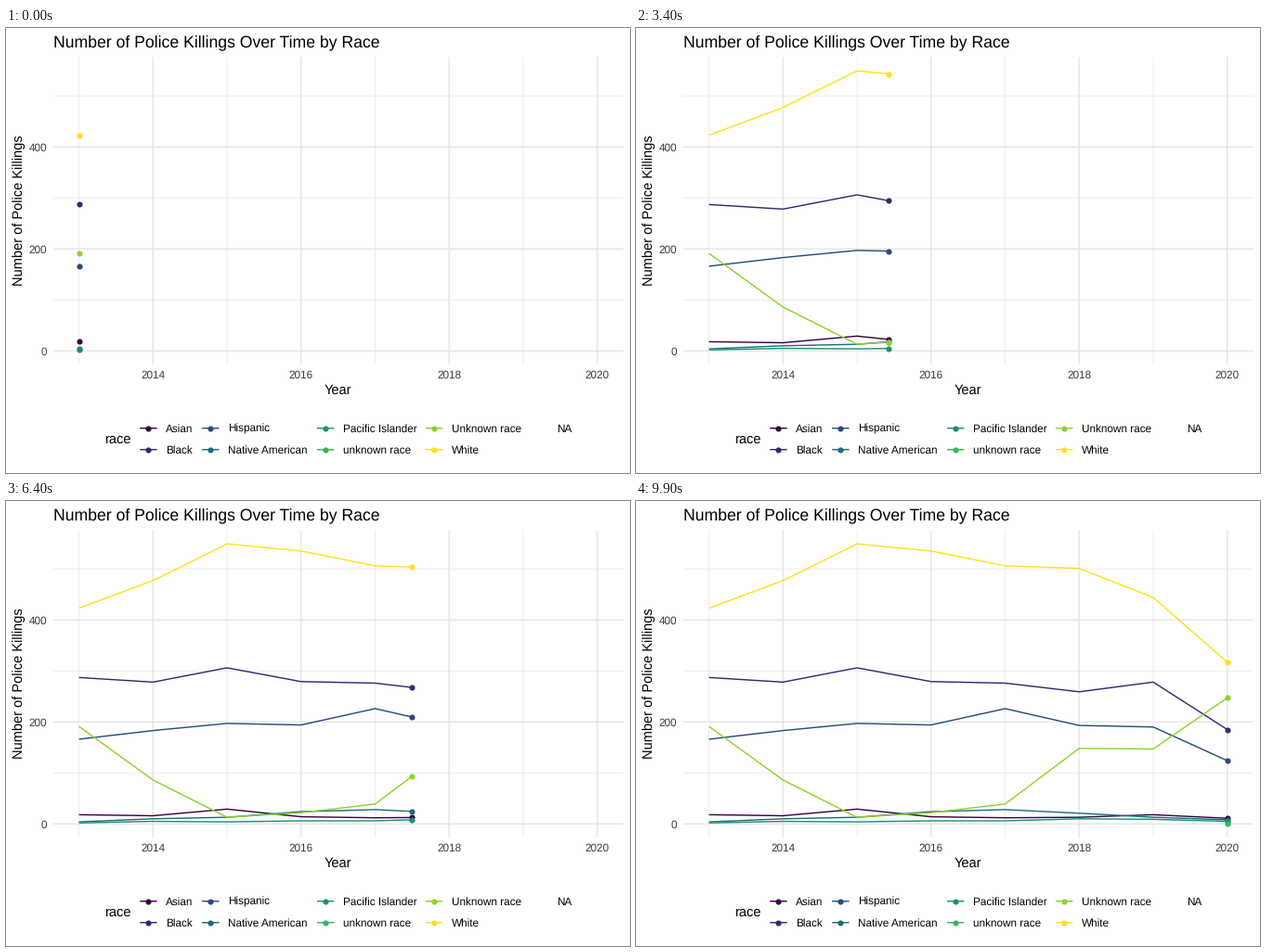
Recreate the animation shown at these times as a matplotlib script. Size 672 by 480 pixels, loop 10000 ms.

```python
import numpy as np
import matplotlib.pyplot as plt
from matplotlib.animation import FuncAnimation

W, H, DPI = 672, 480, 96
PT = 72 / DPI                      # points per pixel
FRAMES = 100
LEFT, RIGHT, TOP, BOTTOM = 50.7, 664.67, 31.2, 362.8
BIG, MEDIUM, SMALL = 13.2, 11, 8.8
LINE, HAIR, DOT = 1.42, 0.71, 6.15

plt.rcParams.update({
    "font.family": "Liberation Sans",
    "text.hinting": "none",
    "path.snap": False,
})


def tone(code):
    """Re-encode an sRGB hex colour with a 1.8 gamma."""
    v = np.array([int(code[i:i + 2], 16) for i in (1, 3, 5)]) / 255
    linear = np.where(v <= 0.04045, v / 12.92, ((v + 0.055) / 1.055) ** 2.4)
    return tuple(linear ** (1 / 1.8))


def px(year):
    step = (RIGHT - LEFT) / 7.7
    return LEFT + (np.asarray(year) - 2013 + 0.35) * step


def py(count):
    return 348.3 - 0.5502 * np.asarray(count)


YEARS = np.arange(2013, 2021)
SERIES = {
    "Asian": ("#440154", [18, 16, 29, 14, 12, 13, 18, 11]),
    "Black": ("#46337E", [287, 278, 306, 279, 276, 259, 278, 185]),
    "Hispanic": ("#365C8D", [166, 183, 197, 194, 226, 193, 190, 124]),
    "Native American": ("#277F8E", [4, 10, 13, 24, 28, 21, 13, 8]),
    "Pacific Islander": ("#1FA187", [2, 5, 4, 6, 6, 10, 9, 5]),
    "unknown race": ("#4AC16D", [np.nan] * 7 + [1]),
    "Unknown race": ("#9FDA3A", [191, 86, 13, 22, 39, 148, 147, 247]),
    "White": ("#FDE725", [423, 477, 549, 535, 506, 501, 444, 317]),
}
GRID, TICK = tone("#EBEBEB"), tone("#4D4D4D")

fig = plt.figure(figsize=(W / DPI, H / DPI), dpi=DPI, facecolor="white")
ax = fig.add_axes([0, 0, 1, 1])
ax.set(xlim=(0, W), ylim=(H, 0))
ax.axis("off")


def stroke(x, y, color, width=LINE, z=2):
    return ax.plot(x, y, color=color, lw=width * PT, zorder=z,
                   solid_capstyle="butt", solid_joinstyle="round")[0]


def dot(x, y, color):
    return ax.plot([x], [y], "o", color=color, ms=DOT * PT, mew=0, zorder=3)[0]


def label(x, y, text, size, color="black", **kw):
    ax.text(x, y, text, fontsize=size, color=color, va="baseline", **kw)


# Grid and axes
for year in YEARS:
    major = year % 2 == 0
    stroke([px(year)] * 2, [TOP, BOTTOM], GRID, LINE if major else HAIR, 1)
    if major:
        label(px(year), 378.1, str(year), SMALL, TICK, ha="center")
for count in range(0, 600, 100):
    major = count % 200 == 0
    stroke([LEFT, RIGHT], [py(count)] * 2, GRID, LINE if major else HAIR, 1)
    if major:
        label(44.1, py(count) + 4.2, str(count), SMALL, TICK, ha="right")

label(LEFT, 20, "Number of Police Killings Over Time by Race", BIG)
label((LEFT + RIGHT) / 2, 395, "Year", MEDIUM, ha="center")
label(17.8, (TOP + BOTTOM) / 2, "Number of Police Killings", MEDIUM,
      ha="center", rotation=90, rotation_mode="anchor")

# Legend, filled column by column
label(106, 448, "race", MEDIUM)
KEYS = [153.4, 220.3, 344.2, 461.2, 573.9]
for i, name in enumerate([*SERIES, "NA"]):
    x, y = KEYS[i // 2], 431.7 + 23.04 * (i % 2)
    if name in SERIES:
        color = tone(SERIES[name][0])
        stroke([x - 9.2, x + 9.2], [y, y], color)
        dot(x, y, color)
    label(x + 18.85, y + 4.2, name, SMALL)

# Moving parts
curves = []
for code, counts in SERIES.values():
    color = tone(code)
    curves.append((np.array(counts, float),
                   stroke([], [], color), dot(np.nan, np.nan, color)))

# Each year falls on a whole frame
STOPS = np.round(np.arange(8) * (FRAMES - 1) / 7)


def update(frame):
    last = np.searchsorted(STOPS, frame, side="right") - 1
    now = np.interp(frame, STOPS, YEARS)
    xs = px(np.append(YEARS[:last + 1], now))
    artists = []
    for counts, line, head in curves:
        if frame == STOPS[last]:
            value = counts[last]
        else:
            part = now - YEARS[last]
            value = counts[last] * (1 - part) + counts[last + 1] * part
        line.set_data(xs, py(np.append(counts[:last + 1], value)))
        head.set_data([xs[-1]], [py(value)])
        artists += [line, head]
    return artists


anim = FuncAnimation(fig, update, frames=FRAMES, interval=100,
                     repeat=True, repeat_delay=0)
plt.show()
```
